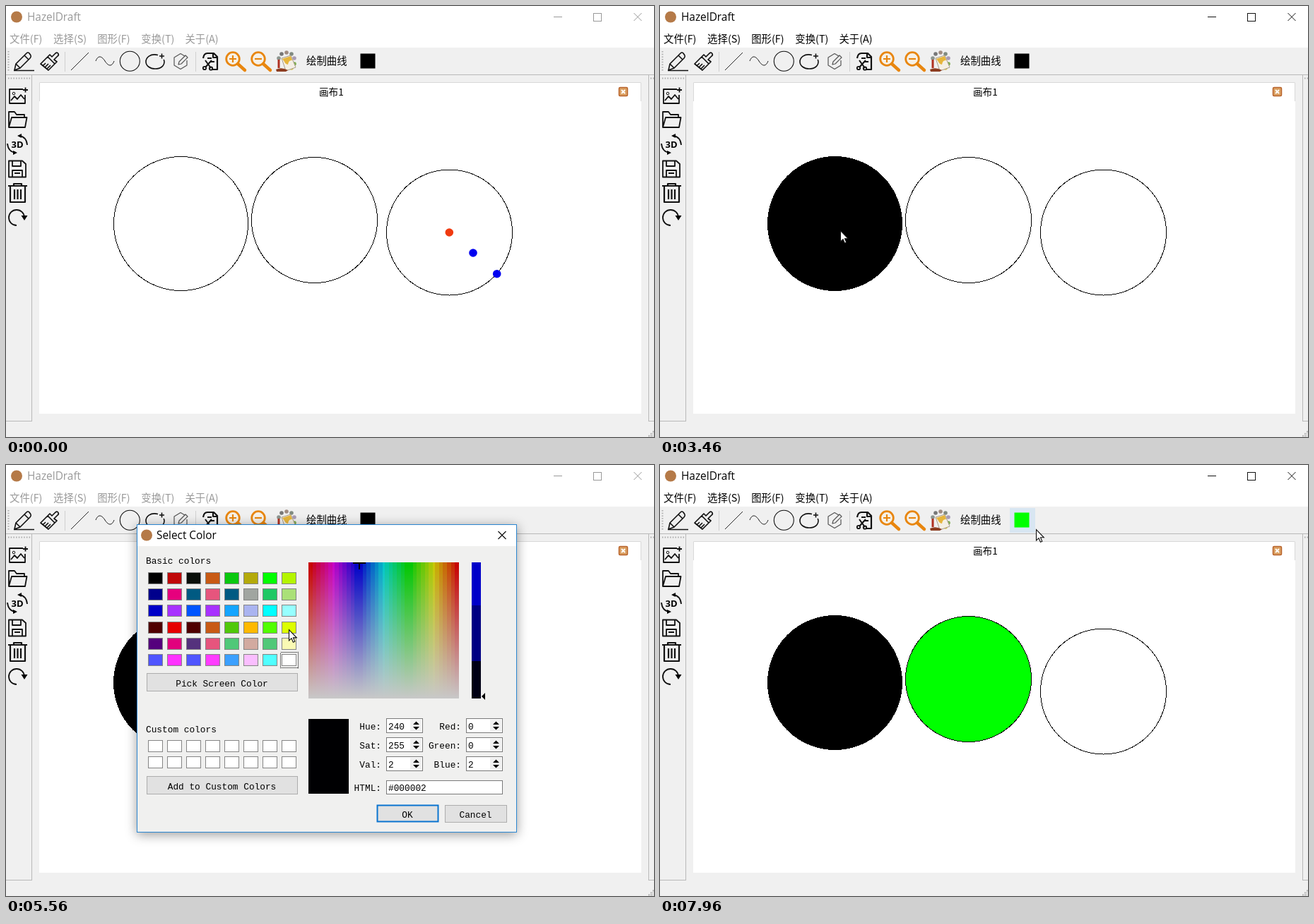
An HTML page that plays this animation: 917x611 px, repeating every 8000 ms.

```html
<!DOCTYPE html>
<html lang="zh">
<head>
<meta charset="utf-8">
<title>HazelDraft</title>
<style>
html, body { margin: 0; width: 100%; height: 100%; overflow: hidden; background: #f0f0f0; }
svg { display: block; width: 100%; height: 100%; }
text { white-space: pre; }
.ui { font: 15.4px "Open Sans", "Noto Sans", sans-serif; }
.cjk { font: 14.4px "Noto Sans CJK SC", "Noto Sans CJK", sans-serif; }
.mono { font: 12.8px "Liberation Mono", monospace; }
.line { fill: none; stroke: #111; stroke-linejoin: round; }
.crisp { shape-rendering: crispEdges; }
</style>
</head>
<body>
<svg id="stage" viewBox="0 0 917 611"></svg>
<script>
const LOOP = 8000;
const LIME = '#00ff00';

const rect = (x, y, w, h, fill, more = '') =>
  `<rect x="${x}" y="${y}" width="${w}" height="${h}" fill="${fill}" ${more}/>`;
const box = (x, y, w, h, fill, stroke, more = '') =>
  rect(x + .5, y + .5, w, h, fill, `stroke="${stroke}" ${more}`);
const circle = (x, y, r, fill, more = '') =>
  `<circle cx="${x}" cy="${y}" r="${r}" fill="${fill}" ${more}/>`;
const path = (d, more = '') => `<path d="${d}" ${more}/>`;
const line = (d, width, more = '') => path(d, `class="line" stroke-width="${width}" ${more}`);
const text = (x, y, s, cls, more = '') => `<text x="${x}" y="${y}" class="${cls}" ${more}>${s}</text>`;
const list = (n, f) => Array.from({ length: n }, (_, i) => f(i)).join('');

function windowFrame() {
  const menus = ['文件(F)', '选择(S)', '图形(F)', '变换(T)', '关于(A)'];
  const edge = '#b9b9b9';
  return rect(0, 0, 917, 611, '#f0f0f0') + rect(0, 0, 917, 59, '#fff') +
    circle(15, 15.5, 8, '#b57a48') +
    `<g id="title">${text(30, 21, 'HazelDraft', 'ui')}</g>` +
    `<g id="controls" fill="none">${path('M775 15.5H787M831.5 10.5h11v11h-11z', 'class="crisp"')}` +
    path('M888.5 10l11 11M899.5 10l-11 11') + '</g>' +
    `<g id="menu">${menus.map((s, i) => text(5 + i * 62.1, 52, s, 'cjk')).join('')}</g>` +
    rect(0, 97, 917, 1, edge) + rect(36, 98, 1, 490, edge) + rect(0, 588, 37, 1, edge) +
    rect(909, 98, 1, 490, edge) + rect(909, 588, 8, 1, edge) +
    rect(83, 65, 1, 28, '#d0d0d0') + rect(268, 65, 1, 28, '#d0d0d0') +
    path('M3.5 64V93M3 102.5H35M912 102.5h5', 'stroke="#aaa" stroke-width="2" stroke-dasharray="1.5 2.2"') +
    path('M909 609.5h7M912 606.5h4M915 603.5h2', 'stroke="#b0b0b0" stroke-width="2" stroke-dasharray="2 1"') +
    rect(47, 108, 852, 470, '#fff') +
    path('M47.5 135V108.5H898.5V135', 'fill="none" stroke="#d9d9d9"');
}

function zoom(x, sign) {
  return `<g fill="none" stroke="#e8860f">${circle(x, 75, 9.3, '#f6f1e8', 'stroke-width="2.8"')}` +
    path(`M${x + 7} 82l10 9`, 'stroke-width="4.4" stroke-linecap="round"') +
    path(`M${x - 5} 75h10${sign}`, 'stroke-width="2.2"') + '</g>';
}

function paintCan() {
  const dots = [[386, 74, '#8d9690'], [390, 68, '#777'], [397, 66, '#a08b80'], [404, 68, '#808a80'],
    [408, 74, '#a89bb5'], [408, 82, '#7fae50'], [404, 88, '#d8c64a']];
  return dots.map(([x, y, c]) => circle(x, y, 2.8, c)).join('') +
    path('M390 74L403 70L410 87L396 92Z', 'fill="#f4efe4" stroke="#a99c8a"') +
    path('M391 75L403 71L405 77Q400 76 399 83Q395 82 394 79Z', 'fill="#e6b53c"') +
    path('M386 76V88', 'stroke="#b03020" stroke-width="3"') +
    path('M382 90Q390 86 399 91L396 93H383Z', 'fill="#8c3c20"');
}

function cutPage() {
  return line('M279 74Q280 67 285 67H294L299 72V90H292M293 67V73H299M285 74H291M289 79H295', 2.2) +
    line('M282 77L290 88M291 77L282 87', 2) +
    circle(281, 88, 2.2, 'none', 'class="line" stroke-width="1.8"') +
    circle(290, 88.5, 2.2, 'none', 'class="line" stroke-width="1.8"');
}

function toolbar() {
  return '<g id="canHover">' + rect(379, 61, 36, 35, '#d8e6f2') + '</g>' +
    '<g id="inkHover">' + rect(495, 61, 36, 35, '#d8e6f2') + '</g>' +
    line('M12 91L14 82L29 67Q31 65 33 67L35 70Q36 72 34 74L20 88ZM26 70L32 76M14 82L20 88M11 91.5H40', 1.6) +
    line('M49 82L59 72L69 82L60 91ZM59 72L62 69L65 72L70 67Q73 65 74 68Q75 70 73 71L68 76L72 79L69 82M52 85L56 81M55 87L60 82M58 89L63 84', 1.7) +
    line('M92 91L117 66', .9) +
    line('M127 78C130 70 135 70 140 78S150 86 153 78', 1) +
    circle(175.3, 78.3, 14, 'none', 'stroke="#111" stroke-width="1.1"') +
    line('M215 69.5C204 67 198 73 198 79C198 85 204 89 211 89C219 89 224 85 224 79Q224 77 223 76M217 71H224M220.5 67.5V74.5', 1.6) +
    line('M253 71L247 67.5L238 73V84L247 89.5L256 84V77M244 83L245 79L254 70L257 73L248 82Z', 1.2, 'style="stroke:#555"') +
    cutPage() + zoom(324 - 3, 'M321 70v10') + zoom(357, '') + paintCan() +
    text(425, 83, '绘制曲线', 'cjk') +
    rect(501.5, 67.5, 21, 21, '#000', 'id="ink"');
}

function sidebar() {
  return line('M24 118H5V138H27V126M7 134L12 128L16 132L21 126L26 132M24 119H31M27.5 115.5V122.5', 1.8) +
    circle(11, 124, 1.8, 'none', 'stroke="#111"') +
    line('M4 172V150H12L15 154H26V158M4 172L8 158H29.5L27 172Z', 1.8) +
    line('M18 184Q29 185 30 197M14 208Q3 207 2 195', 1.8) +
    path('M16 184l6-3v6zM16 208l-6 3v-6z') +
    text(16, 201, '3D', 'ui', 'text-anchor="middle" style="font-size:13px;font-weight:700"') +
    line('M4 219.5H23L28 224V242.5H4ZM9 220V227H21V220M9 242V233H23V242M12 237H20', 1.8) +
    line('M3 255H30M11 254V252H22V254M6 256V278H27V256M12 260V274M16.5 260V274M21 260V274', 2.2) +
    line('M15 311A11 11 0 1 1 26 300', 1.8) + path('M21.5 297H30.5L26 304Z');
}

function art() {
  const ring = (x, y, r, id) => circle(x, y, r, '#fff', `id="${id}" stroke="#000" class="crisp"`);
  return '<g id="art">' + text(443, 127, '画布1', 'cjk', 'style="font-size:13.6px"') +
    ring(247.5, 308.5, 95, 'ringA') + ring(436.5, 303.5, 89, 'ringB') + ring(627.5, 321, 89, 'ringC') +
    `<g id="handles">${circle(627.3, 321, 5.8, '#f03a10')}${circle(661, 350, 5.8, '#0000f0')}` +
    circle(694.7, 379.7, 5.8, '#0000f0') + '</g></g>' +
    box(867, 115, 12, 12, '#dba062', '#b8632c', 'rx="1.5" stroke-width="1.5"') +
    path('M871 119l5 5M876 119l-5 5', 'stroke="#fff" stroke-width="1.8"');
}

const SWATCHES = [
  '#000 #c00808 #0a0f0a #c85a14 #0ac80f #b4aa0a #0f0 #b4f500',
  '#00008c #e6007d #005a82 #e6557d #005a82 #a0a5a0 #1ec864 #aae078',
  '#0000c8 #a832ff #05f #a832ff #14a5ff #aab4f0 #0ff #96ffff',
  '#500000 #e60000 #500000 #c85a14 #50c80a #ffb900 #50ff00 #dcff00',
  '#55007d #e1007d #55327d #e6557d #50c878 #d2aaa0 #50c878 #fafab4',
  '#5055ff #ff32ff #5055ff #ff3cff #3ca0ff #fabeff #50ffff #fff'
].map(row => row.split(' '));

const swatch = (c, y, fill) => box(201 + c * 27, y, 20, 16, fill, '#858585', 'class="crisp"');

function spin(x, y, label, right) {
  const ax = x + 42.5;
  return text(right, y + 16, label, 'mono', 'text-anchor="end"') +
    box(x, y, 51, 20, '#fff', '#7a7a7a') + rect(x + 34, y + 2, 16, 17, '#f0f0f0') +
    path(`M${ax - 4.5} ${y + 9}h9l-4.5-4.5zM${ax - 4.5} ${y + 12}h9l-4.5 4.5z`) +
    text(x + 3, y + 16, '', 'mono num');
}

function button(x, y, w, h, label, main) {
  return box(x, y, w, h, '#e1e1e1', main ? '#0a74d0' : '#adadad', main ? 'stroke-width="2"' : '') +
    text(x + w / 2, y + h / 2 + 6, label, 'mono', 'text-anchor="middle"');
}

function colourField() {
  const hues = ['#c80000', '#c800c8', '#0000c8', '#00c8c8', '#00c800', '#c8c800', '#c80000'];
  const bands = ['R', 'G', 'B'].map(c =>
    `<feFunc${c} type="discrete" tableValues="0 .15 .28 .41 .53 .66 .784 .9"/>`).join('');
  const area = (fill, more) => rect(428, 138, 213, 193, fill, more);
  return `<defs><linearGradient id="hue">${hues.map((c, i) => `<stop offset="${i / 6}" stop-color="${c}"/>`).join('')}</linearGradient>
    <linearGradient id="grey" x2="0" y2="1"><stop stop-color="#c8c8c8" stop-opacity="0"/><stop offset="1" stop-color="#c8c8c8"/></linearGradient>
    <filter id="bands" x="0" y="0" width="1" height="1" color-interpolation-filters="sRGB"><feComponentTransfer>${bands}</feComponentTransfer></filter></defs>
    ${area('url(#hue)', 'filter="url(#bands)"')}${area('url(#grey)')}
    <svg x="428" y="138" width="213" height="193">${path('M-9 0H9M0 -9V9', 'id="cross" stroke="#000" stroke-width="2"')}</svg>`;
}

function dialog() {
  const labels = ['Hue:', 'Sat:', 'Val:', 'Red:', 'Green:', 'Blue:'];
  return `<defs><clipPath id="inside">${rect(186, 114, 536, 406, '#000')}</clipPath></defs>
    <g id="dialog">${rect(185, 84, 538, 437, '#fff', 'style="filter:drop-shadow(0 3px 8px rgba(0,0,0,.4))"')}
    <g clip-path="url(#inside)"><use href="#art"/></g><g id="form">` +
    rect(186, 115, 536, 405, '#f0f0ef') +
    text(198, 140, 'Basic colors', 'mono') + text(198, 379, 'Custom colors', 'mono') +
    SWATCHES.map((row, r) => row.map((c, i) => swatch(i, Math.round(152 + r * 23.2), c)).join('')).join('') +
    list(16, i => swatch(i % 8, i < 8 ? 390 : 413, '#fff')) +
    box(0, 0, 25, 22, 'none', '#000', 'id="focus" stroke-dasharray="1 1" class="crisp"') +
    button(199, 295, 213, 25, 'Pick Screen Color') + button(199, 441, 213, 25, 'Add to Custom Colors') +
    colourField() +
    list(3, i => rect(659, [138, 199, 278][i], 13, [61, 79, 53][i], '#000', 'class="shade"')) +
    path('M673 0l5-5v10z', 'id="mark"') +
    rect(428, 360, 57, 106, '#000', 'id="preview"') +
    labels.map((s, i) => i < 3 ? spin(538, 359 + i * 27, s, 531) : spin(651, 278 + i * 27, s, 644)).join('') +
    text(531, 462, 'HTML:', 'mono', 'text-anchor="end"') + box(538, 447, 164, 19, '#fff', '#7a7a7a') +
    text(541, 462, '', 'mono', 'id="hex"') +
    button(525, 482, 86, 23, 'OK', true) + button(621, 482, 87, 24, 'Cancel') + '</g>' +
    circle(199, 99.5, 8, '#b57a48') + text(213, 105, 'Select Color', 'ui') +
    path('M696.5 94l11 11M707.5 94l-11 11', 'stroke="#111" stroke-width="1.2"') +
    box(185, 84, 537, 436, 'none', '#2a86d1') + '</g>';
}

const arrow = path('M.5 .5V16L4 12.7L6.4 18.2L8.8 17.2L6.5 11.8H11.3Z',
  'id="cursor" fill="#fff" stroke="#111" stroke-width="1.1"');

const $ = id => document.getElementById(id);
$('stage').innerHTML = windowFrame() + toolbar() + sidebar() + art() + dialog() + arrow;
const nums = [...document.querySelectorAll('.num')];
const shades = [...document.querySelectorAll('.shade')];

// start, end, steps, target x, y, optional bend x, y
const MOVES = [
  [270, 890, 9, 397, 78],
  [1360, 1980, 9, 255, 318],
  [3690, 4170, 7, 523, 77],
  [4550, 5100, 8, 408, 230],
  [5180, 5180, 1, 399, 231],
  [5560, 5560, 1, 399.5, 233],
  [5710, 6110, 6, 374, 157],
  [6260, 6730, 7, 548.5, 496.5],
  [7030, 7030, 1, 510, 420],
  [7110, 7410, 5, 460, 331],
  [7580, 7960, 6, 532, 91, 570, 220]
];

function cursorAt(t) {
  let x = 738, y = 587;
  for (const [a, b, n, tx, ty, bx = (x + tx) / 2, by = (y + ty) / 2] of MOVES) {
    if (t < a) break;
    const k = n < 2 ? 1 : Math.min(n, Math.floor((t - a) / (b - a) * (n - 1) + 1e-6) + 1) / n;
    const p = k * k * (3 - 2 * k), q = 1 - p;
    x = q * q * x + 2 * p * q * bx + p * p * tx;
    y = q * q * y + 2 * p * q * by + p * p * ty;
  }
  return [x, y];
}

const show = (id, on) => $(id).setAttribute('visibility', on ? 'inherit' : 'hidden');
const set = (id, name, value) => $(id).setAttribute(name, value);
const within = (t, a, b) => t >= a && t < b;

function update(t) {
  const [x, y] = cursorAt(t);
  const active = within(t, 1210, 4320) || t >= 6880;
  const menuOn = within(t, 1210, 4480) || t >= 6950;
  const over = left => y > 60 && y < 96 && x >= left && x < left + 38;
  const open = within(t, 4320, 6880);
  const picked = t >= 6260;

  set('title', 'fill', active ? '#000' : '#999');
  set('controls', 'stroke', active ? '#111' : '#999');
  set('menu', 'fill', menuOn ? '#000' : '#999');
  show('canHover', t >= 270 && over(379));
  show('inkHover', (!open || t < 4550) && over(495));
  set('ink', 'fill', t >= 6950 ? LIME : '#000');
  show('handles', t < 1360);
  set('ringA', 'fill', t >= 3460 ? '#000' : '#fff');
  set('ringB', 'fill', t >= 7410 ? LIME : '#fff');

  show('dialog', open);
  set('dialog', 'opacity', t < 4400 || t >= 6800 ? .5 : 1);
  show('form', open && t >= 4480);
  set('focus', 'transform', t >= 6110 ? 'translate(361 149)' : 'translate(388 265)');
  const values = picked ? [120, 255, 255, 0, 255, 0] : [240, 255, 2, 0, 0, 2];
  nums.forEach((el, i) => { el.textContent = values[i]; });
  $('hex').textContent = picked ? LIME : '#000002';
  set('preview', 'fill', picked ? LIME : '#000002');
  set('cross', 'transform', `translate(${picked ? 142 : 72} 1)`);
  set('mark', 'transform', `translate(0 ${picked ? 139 : 328})`);
  shades.forEach((el, i) => {
    const v = [200, 130, 20][i];
    el.setAttribute('fill', picked ? `rgb(0,${v},0)` : `rgb(0,0,${v})`);
  });

  show('cursor', t >= 270);
  set('cursor', 'transform', `translate(${Math.round(x)} ${Math.round(y)})`);
}

const begin = performance.now();
function frame() {
  update((performance.now() - begin) % LOOP);
  requestAnimationFrame(frame);
}
frame();
</script>
</body>
</html>
```
